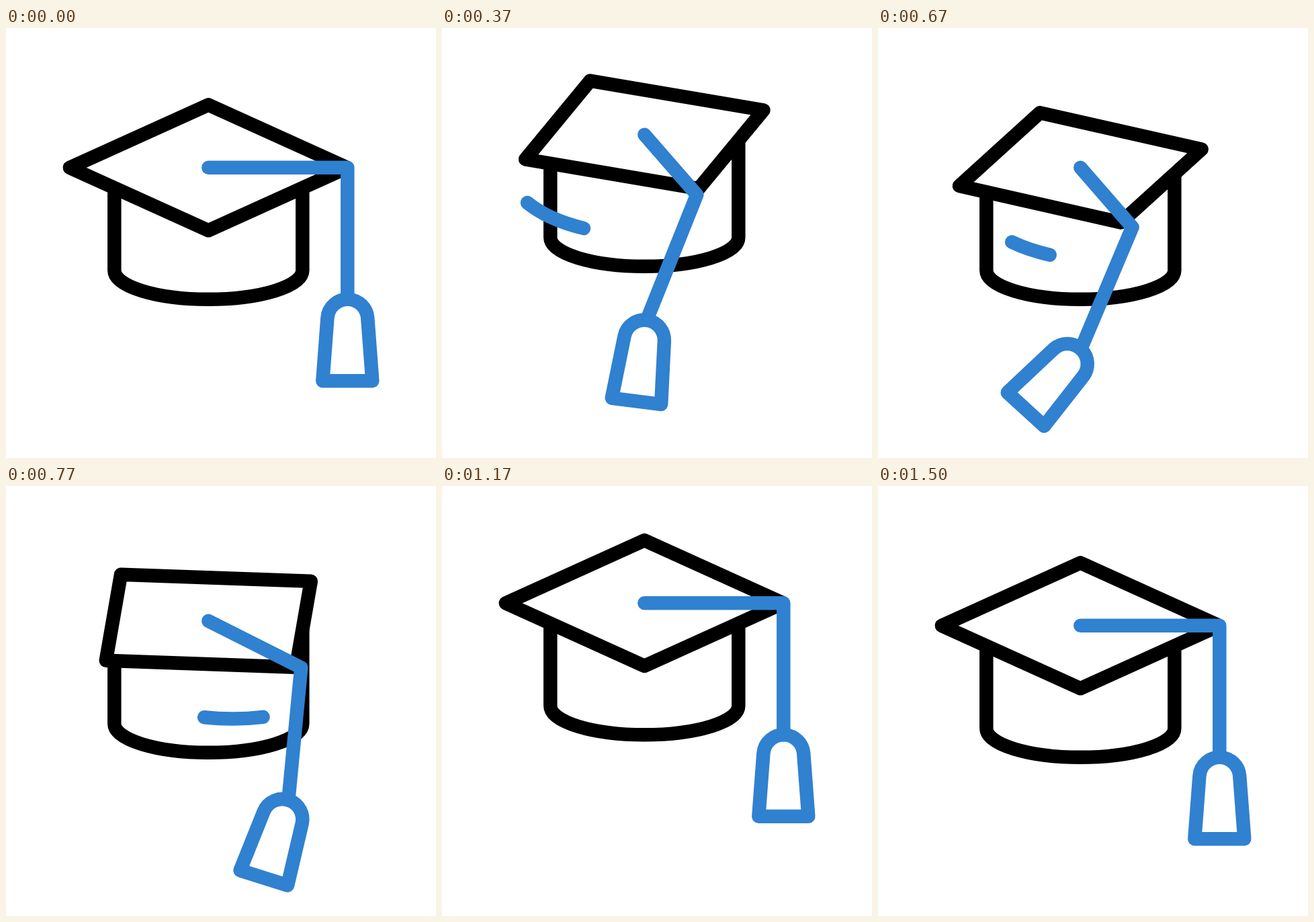
Animation of 640x640 px, one loop 1670 ms. Source, as an HTML page with a canvas:

```html
<!DOCTYPE html>
<html lang="en">
<head>
<meta charset="utf-8">
<title>Graduation cap</title>
<style>
  html, body { margin: 0; width: 100%; height: 100%; overflow: hidden; background: #fff; }
  canvas { display: block; width: 640px; height: 640px; }
</style>
</head>
<body>
<canvas id="stage" width="640" height="640"></canvas>
<script>
const ctx = document.getElementById('stage').getContext('2d');
const LOOP = 1670, LAST_TICK = 45;
const BLACK = '#000', BLUE = '#3081d0';
const CX = 301.3, RX = 206.5, RY = 93.5;
const RAD = Math.PI / 180;

// Monotone cubic through [tick, value] pairs, at rest at both ends and at extremes.
function track(...keys) {
  const slope = i => (keys[i + 1][1] - keys[i][1]) / (keys[i + 1][0] - keys[i][0]);
  const tangents = keys.map((_, i) => {
    if (i === 0 || i === keys.length - 1) return 0;
    const a = slope(i - 1), b = slope(i);
    return a * b > 0 ? 2 * a * b / (a + b) : 0;
  });
  return tick => {
    const next = keys.findIndex(k => k[0] > tick);
    if (next < 0) return keys[keys.length - 1][1];
    const [x0, y0] = keys[next - 1], [x1, y1] = keys[next];
    const h = x1 - x0, u = (tick - x0) / h, v = 1 - u;
    return y0 * v * v * (1 + 2 * u) + y1 * u * u * (3 - 2 * u)
      + h * u * v * (v * tangents[next - 1] - u * tangents[next]);
  };
}

const lift = track([0, 0], [5, -33], [10, -50], [11, -49], [16, -17], [20, 0],
  [23, -7], [32.3, -37.5], [35, -33.5], [45, 0]);
const turn = track([0, 0], [5, 23.3], [11, 65.5], [16, 90.5], [23, 49.5], [31, 0]);
const boardScale = track([0, 1], [5, .975], [11, 1.02], [16, .985], [23, 1], [31, 1]);
const cornerX = track([0, 207], [5, 184], [11, 78], [16, 12.5], [23, 138], [31, 207]);
const cornerY = track([0, 0], [5, 27], [11, 89.5], [16, 103], [23, 69.5], [31, 0]);
const ropeAngle = track([0, 0], [4, 4.9], [5, 4.8], [11, -21.8], [16, -40.9],
  [23, -5.5], [28, 8], [32, 0]);
const ropeLength = track([0, 196], [11, 201], [16, 195], [23, 198], [32, 196]);
const tasselAngle = track([0, 0], [4, 24], [5, 22.6], [11, -7.2], [16, -62.6],
  [23, -17.5], [28, 25], [32, 0]);

function smooth(tick, from, to) {
  const u = Math.min(1, Math.max(0, (tick - from) / (to - from)));
  return u * u * (3 - 2 * u);
}

function stroke(color) {
  ctx.strokeStyle = color;
  ctx.stroke();
}

function drawBand(cy) {
  ctx.beginPath();
  ctx.moveTo(CX - 140, cy);
  ctx.lineTo(CX - 140, cy + 153);
  ctx.ellipse(CX, cy + 153, 140, 43, 0, Math.PI, 0, true);
  ctx.lineTo(CX + 140, cy);
  stroke(BLACK);
}

// The corners run along straight chords between eighth turns.
function drawBoard(tick, cy) {
  const angle = turn(tick);
  const size = boardScale(tick) * Math.cos(22.5 * RAD) / Math.cos((angle % 45 - 22.5) * RAD);
  ctx.beginPath();
  for (let i = 0; i < 4; i++) {
    const a = (angle + 90 * i) * RAD;
    ctx.lineTo(CX + RX * size * Math.cos(a), cy + RY * size * Math.sin(a));
  }
  ctx.closePath();
  ctx.fillStyle = '#fff';
  ctx.fill();
  stroke(BLACK);
}

function drawTassel(tick, cy) {
  const x = CX + cornerX(tick), y = cy + cornerY(tick);
  const swing = ropeAngle(tick) * RAD, length = ropeLength(tick);
  const endX = x + length * Math.sin(swing), endY = y + length * Math.cos(swing);
  ctx.beginPath();
  ctx.moveTo(CX, cy);
  ctx.lineTo(x, y);
  ctx.lineTo(endX, endY);
  stroke(BLUE);

  ctx.save();
  ctx.translate(endX, endY);
  ctx.rotate(-tasselAngle(tick) * RAD);
  ctx.beginPath();
  ctx.moveTo(-37, 121.5);
  ctx.arc(0, 30, 30, Math.PI + .08, -.08);
  ctx.lineTo(37, 121.5);
  ctx.closePath();
  stroke(BLUE);
  ctx.restore();
}

// Part of the lower side of an ellipse; angles are measured from its lowest point.
function drawSweep(x, bottom, ry, tail, head) {
  if (Math.abs(head - tail) < .1) return;
  ctx.beginPath();
  ctx.ellipse(x, bottom - ry, 203, ry, 0, (90 - tail) * RAD, (90 - head) * RAD, head > tail);
  stroke(BLUE);
}

function draw(tick) {
  const cy = 207.8 + lift(tick);
  ctx.clearRect(0, 0, 640, 640);
  ctx.lineWidth = 20.5;
  ctx.lineCap = ctx.lineJoin = 'round';
  drawBand(cy);
  drawBoard(tick, cy);
  drawSweep(301, 308.5, 100, 59 - 118 * smooth(tick, 2.7, 15.4), 59 - 118 * smooth(tick, 0, 10));
  drawSweep(337, 346.5, 105, -56 + 112 * smooth(tick, 17, 31), -56 + 112 * smooth(tick, 15.2, 28.7));
  drawTassel(tick, cy);
}

// Thirty pictures a second, each starting on a hundredth of a second.
function frame() {
  const time = performance.now() % LOOP;
  draw(Math.min(LAST_TICK, Math.floor((Math.floor(time / 10) + .5) * .3)));
  requestAnimationFrame(frame);
}
frame();
</script>
</body>
</html>
```
